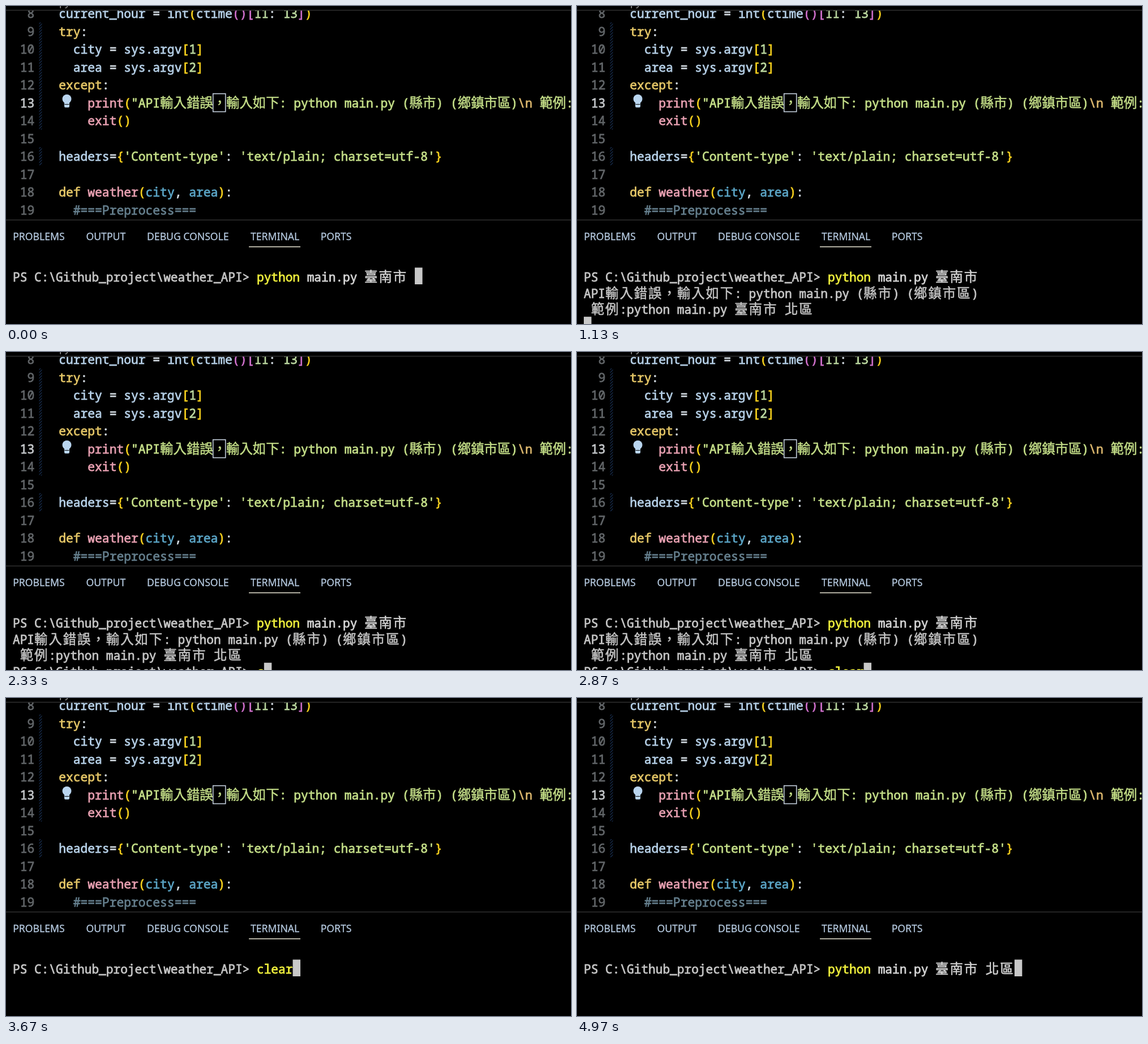
These frames come from a looping animation (998 px wide and 561 px high, 5010 ms). An HTML page:

```html
<!DOCTYPE html>
<html lang="zh-Hant">
<head>
<meta charset="utf-8">
<title>Terminal demo</title>
<style>
  html, body { margin: 0; width: 100%; height: 100%; overflow: hidden; background: #000; }
  svg { display: block; width: 998px; height: 561px; }
  text { white-space: pre; }
  .mono { font-family: "Noto Sans Mono", "Noto Sans CJK TC", monospace; font-weight: 500; }
  .mono tspan { stroke-width: .8px; }
  .mono .cjk { font-family: "Noto Sans CJK TC", "Noto Sans CJK", sans-serif; font-size: 23.4px; stroke-width: .5px; }
  #terminal .cjk { letter-spacing: 1.96px; }
  #tabs text { font: 17.6px "Noto Sans", "Open Sans", sans-serif; fill: #b4c8de; stroke: #b4c8de; stroke-width: .3px; }
</style>
</head>
<body>
<svg viewBox="0 0 998 561">
  <defs>
    <pattern id="hatch" width="5" height="5" patternUnits="userSpaceOnUse">
      <path d="M-1 6L6 -1M-1 1L1 -1M4 6L6 4" stroke="#162b4c" stroke-width="1.4"/>
    </pattern>
  </defs>
  <g id="editor" class="mono"></g>
  <path d="M58.5 29h5v189h-5zM58.5 249h5v32h-5z" fill="url(#hatch)"/>
  <g fill="#b9d5ef">
    <circle cx="107.5" cy="164" r="8"/>
    <path d="M103 169h9v8q0 2-2 2h-5q-2 0-2-2z"/>
  </g>
  <path d="M103.5 173.5h8" stroke="#000"/>
  <rect x="365.7" y="154.7" width="22" height="31.8" fill="none" stroke="#c4cfdc" stroke-width="1.6"/>
  <rect width="998" height="8" fill="#000"/>
  <text x="94" y="0" font-family="Noto Sans, sans-serif" font-size="17" fill="#9a9a9a">py</text>
  <path d="M0 7.5H998M0 377.5H998" stroke="#303030" stroke-width="1.3"/>
  <g id="tabs">
    <text x="12.2" y="413">PROBLEMS</text>
    <text x="141.5" y="413">OUTPUT</text>
    <text x="249" y="413">DEBUG CONSOLE</text>
    <text x="432" y="413">TERMINAL</text>
    <text x="555.7" y="413">PORTS</text>
    <path d="M429 424.7H520" stroke="#e6e3d2" stroke-width="1.6"/>
  </g>
  <g id="terminal" class="mono"></g>
</svg>
<script>
const SVG = 'http://www.w3.org/2000/svg';
const CJK = /([\u2e80-\uffef]+)/;
const colors = {
  plain: '#b5cfe6', op: '#d3dbe2', keyword: '#e3c566', call: '#e69fb0', string: '#c3dd87',
  gold: '#f5cf1d', orchid: '#d070cc', param: '#5ba5c6', escape: '#d9b56c', comment: '#657f8d',
  number: '#bcd9a0', gutter: '#626669', current: '#c4c7ca',
  term: '#c6c6c6', command: '#eeee3c', arg: '#d4d4d4'
};

function add(parent, name, attrs, content = '') {
  const node = document.createElementNS(SVG, name);
  for (const key in attrs) node.setAttribute(key, attrs[key]);
  node.textContent = content;
  return parent.appendChild(node);
}

// runs: [color, text, color, text, ...]
function addLine(parent, x, y, size, runs, anchor = 'start') {
  const line = add(parent, 'text', { x, y, 'font-size': size, 'text-anchor': anchor });
  for (let i = 0; i < runs.length; i += 2) {
    const fill = colors[runs[i]];
    for (const part of runs[i + 1].split(CJK)) {
      if (part) add(line, 'tspan', { fill, stroke: fill, class: CJK.test(part) ? 'cjk' : 'latin' }, part);
    }
  }
}

const source = [
  ['plain', 'current_hour', 'op', ' = ', 'plain', 'int', 'gold', '(', 'plain', 'ctime', 'orchid', '()[',
    'number', '11', 'op', ': ', 'number', '13', 'orchid', ']', 'gold', ')'],
  ['keyword', 'try', 'op', ':'],
  ['plain', '  city', 'op', ' = ', 'plain', 'sys.argv', 'gold', '[', 'number', '1', 'gold', ']'],
  ['plain', '  area', 'op', ' = ', 'plain', 'sys.argv', 'gold', '[', 'number', '2', 'gold', ']'],
  ['keyword', 'except', 'op', ':'],
  ['call', '    print', 'gold', '(', 'string', '"API輸入錯誤，輸入如下: python main.py (縣市) (鄉鎮市區)',
    'escape', '\\n', 'string', ' 範例:python main.py'],
  ['call', '    exit', 'gold', '()'],
  [],
  ['plain', 'headers', 'op', '=', 'gold', '{', 'string', "'Content-type'", 'op', ': ',
    'string', "'text/plain; charset=utf-8'", 'gold', '}'],
  [],
  ['keyword', 'def ', 'call', 'weather', 'gold', '(', 'param', 'city', 'op', ', ', 'param', 'area', 'gold', ')', 'op', ':'],
  ['comment', '  #===Preprocess===']
];
const editor = document.getElementById('editor');
source.forEach((runs, i) => {
  const y = 21.2 + 31.5 * i, number = i + 8;
  addLine(editor, 50.2, y, 21.3, [number === 13 ? 'current' : 'gutter', String(number)], 'end');
  addLine(editor, 93.2, y, 21.3, runs);
});

const CELL = 12.68, ROW = 28.9, LEFT = 12;
const prompt = (command = '', args = '') =>
  ['term', 'PS C:\\Github_project\\weather_API> ', 'command', command, 'arg', args];
const first = prompt('python', ' main.py 臺南市 ');
const output = [
  first,
  ['term', 'API輸入錯誤，輸入如下: python main.py (縣市) (鄉鎮市區)'],
  ['term', ' 範例:python main.py 臺南市 北區']
];

// [start time, terminal rows]; the cursor ends the last row
const states = [
  [0, [first]],
  [830, [first, []]],
  [1130, [...output, []]],
  [1200, [...output, prompt()]],
  ...[2230, 2370, 2500, 2670, 2800].map((time, i) => [time, [...output, prompt('clear'.slice(0, i + 1))]]),
  [3270, [[]]],
  [3300, [prompt()]],
  [3670, [prompt('clear')]],
  [3900, [first]],
  [4870, [prompt('python', ' main.py 臺南市 北')]],
  [4900, [prompt('python', ' main.py 臺南市 北區')]]
];

const terminal = document.getElementById('terminal');
const columns = runs => [...runs.filter((_, i) => i % 2).join('')]
  .reduce((sum, char) => sum + (CJK.test(char) ? 2 : 1), 0);

function showTerminal(rows) {
  terminal.replaceChildren();
  rows.forEach((runs, i) => addLine(terminal, LEFT, 485.6 + ROW * i, CELL / 0.6, runs));
  const last = rows.length - 1;
  add(terminal, 'rect', {
    x: LEFT + columns(rows[last]) * CELL, y: 461.5 + ROW * last,
    width: 13.5, height: 29.5, fill: '#c8c8c8'
  });
}

let shown;
function frame() {
  const time = performance.now() % 5010;
  const state = states.findLast(([start]) => start <= time);
  if (state !== shown) showTerminal((shown = state)[1]);
  requestAnimationFrame(frame);
}
frame();
</script>
</body>
</html>
```
